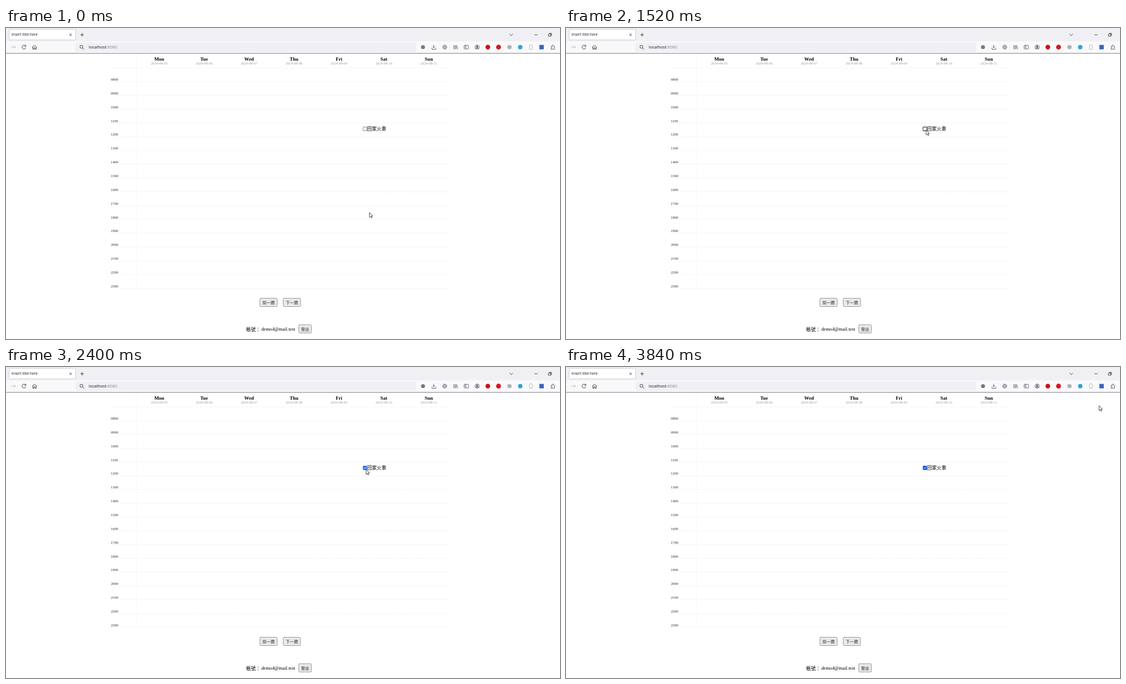
An HTML page for the animation above (3.92 s loop, 998 px wide and 561 px high).

```html
<!DOCTYPE html>
<html lang="zh-Hant">
<head>
<meta charset="utf-8">
<title>Weekly planner</title>
<style>
  html, body { margin: 0; width: 100%; height: 100%; overflow: hidden; background: #fff; }
  svg { display: block; width: 998px; height: 561px; }
  text { font: 8.65px "Liberation Serif", "Noto Sans CJK TC", "Noto Sans CJK", serif; white-space: pre; }
  .mid { text-anchor: middle; }
  .day { font-weight: bold; font-size: 8.9px; }
  .date { font-size: 6.43px; fill: #999; }
  .hour { font-size: 6.5px; fill: #222; }
  .small { font-size: 7.3px; fill: #222; }
  .ui { font-family: "Open Sans", sans-serif; fill: #15141a; }
  .btn { fill: #e9e9ed; stroke: #333; stroke-width: .8; stroke-dasharray: 1.6 1.1; }
  .icon { fill: none; stroke: #5b5b66; stroke-width: .9; }
  .grid { fill: none; stroke: #ececec; stroke-width: .8; stroke-dasharray: 2.1 1.5; }
</style>
</head>
<body>
<svg viewBox="0 0 998 561">
  <path id="lines" class="grid"/>
  <g id="labels"></g>

  <rect id="box" x="643.2" y="178.6" width="6.8" height="6.8" rx="1"/>
  <path id="tick" d="M644.7 182l1.4 1.5 2.6-3.1" fill="none" stroke="#fff"/>
  <text x="650.6" y="185" font-size="8.5">回家火車</text>

  <rect class="btn" x="457.4" y="487.5" width="31.2" height="15" rx="2"/>
  <rect class="btn" x="499.4" y="487.5" width="31.2" height="15" rx="2"/>
  <rect class="btn" x="527.4" y="535.2" width="22.8" height="15" rx="2"/>
  <text class="small mid" x="473" y="498">前一週</text>
  <text class="small mid" x="515" y="498">下一週</text>
  <text class="small mid" x="538.8" y="545.8">登出</text>
  <text x="432.5" y="546.6">帳號：</text>
  <text x="460" y="546.2">demo4@mail.test</text>

  <g id="modal">
    <path d="M0 45h998v516H0z" fill-opacity=".5"/>
    <rect x="433.5" y="277.5" width="122" height="52.5" rx="2" fill="#fff"/>
    <text x="444" y="296">2024-08-10 12:00</text>
    <text x="444" y="307">行程</text>
    <rect x="461.6" y="298.4" width="83.4" height="10.4" rx="1" fill="#fff" stroke="#77777f" stroke-width=".7"/>
    <text x="462.6" y="306.5" style="font-size:7px">回家火車</text>
    <rect x="444.4" y="309.8" width="18.8" height="9.6" rx="1.5" fill="#e9e9ed" stroke="#55555f" stroke-width=".8"/>
    <text x="453.8" y="317" class="mid" style="font:6.7px 'Liberation Sans',sans-serif">Close</text>
  </g>

  <!-- browser window -->
  <path d="M0 0h998v24H0z" fill="#f0f0f4"/>
  <path d="M0 24h998v21H0z" fill="#f9f9fb"/>
  <path id="edge" d="M0 45.8h998" stroke="#77777c"/>
  <rect x="5.5" y="2.3" width="120" height="19.2" rx="2" fill="#fff" stroke="#c9c9d0" stroke-width=".9"/>
  <rect x="125" y="26.5" width="614" height="16.6" rx="2" fill="#f0f0f4"/>
  <text class="ui" x="10" y="14.4" style="font-size:6.6px">Insert title here</text>
  <text class="ui" x="149" y="37.3" style="font-size:7.6px">localhost<tspan fill="#85858e">:8080</tspan></text>
  <g class="icon">
    <path d="M9 34.5h8m-3-3l3 3-3 3" stroke="#b9b9c0"/>
    <path d="M114.4 10.2l4 4m0-4l-4 4M133.8 12.2h6.6m-3.3-3.3v6.6M907 10.7l3.1 3 3.1-3M952 12.2h5.6" stroke="#333"/>
    <path d="M977.3 11h4v4h-4zM978.8 11V9.6h3.9v4h-1.4" stroke="#333"/>
    <path d="M35.2 32.3a3.5 3.5 0 1 0 .6 3M35.8 30.6v2.4h-2.5" stroke="#333"/>
    <path d="M47.4 34.6l4-3.7 4 3.7M48.4 34v4.3h2v-2.5h2v2.5h2V34" stroke="#333"/>
    <path d="M138 36l2.6 2.6" stroke="#333"/><circle cx="135.9" cy="33.8" r="2.7" stroke="#333"/>
    <path d="M770.6 30.5v5m-2-2l2 2 2-2M767.3 35.5v3h6.8v-3"/>
    <circle cx="790.3" cy="34.5" r="1.3"/><circle cx="790.3" cy="34.5" r="3.1"/>
    <circle cx="790.3" cy="34.5" r="3.8" stroke-dasharray="1.5 1.485"/>
    <path d="M806.6 31v7.3m2.2-7.3v7.3m2-7.3v7.3m1-6.8l2 6.8"/>
    <rect x="825.2" y="31.2" width="8" height="6.6" rx="1"/><path d="M828.4 31v7M826.2 33h1.2m-1.2 1.7h1.2"/>
    <circle cx="848.8" cy="34.5" r="3.9"/><circle cx="848.8" cy="33.4" r="1.3" fill="#5b5b66"/>
    <path d="M846.5 36.9q2.3-2.2 4.6 0" stroke-width="1.3"/>
    <rect x="943.2" y="30.5" width="5" height="8" rx=".8" stroke="#b5b5bc"/>
    <path d="M982 33h2v-1.2a1.1 1.1 0 0 1 2.2 0V33h2v5.3H982v-1.6h.8a1 1 0 0 0 0-2H982z"/>
  </g>
  <circle cx="751.2" cy="34.5" r="3.6" fill="#77777f"/>
  <circle cx="868" cy="34.5" r="4.2" fill="#c8141c"/>
  <circle cx="887.3" cy="34.5" r="4.4" fill="#d8151c"/>
  <circle cx="907" cy="34.5" r="3.8" fill="#b0b0b6"/>
  <circle cx="926.4" cy="34.5" r="4" fill="#2aa5dc"/>
  <rect x="960.8" y="30.5" width="8" height="8" fill="#3568b8"/>

  <path id="cursor" d="M0 0v8.8l2-1.8 1.4 3 1.5-.7-1.4-2.9h2.7z" fill="#fff" stroke="#222" stroke-width=".8" stroke-linejoin="round"/>
</svg>
<script>
const $ = id => document.getElementById(id);
const LOOP = 3920, STEP = 80, ROW = 24.85;

let grid = 'M235 47V469', labels = '';
const label = (cls, x, y, s) => labels += `<text class="${cls}" x="${x}" y="${y}">${s}</text>`;
'Mon Tue Wed Thu Fri Sat Sun'.split(' ').forEach((day, i) => {
  const x = 276 + i * 80.95;
  label('day mid', x, 58.7, day);
  label('date mid', x, 66.2, '2024-08-' + String(5 + i).padStart(2, '0'));
});
for (let i = 0; i < 17; i++) {
  grid += `M189 ${72 + i * ROW}H800`;
  if (i < 16) label('hour', 189, 95 + i * ROW, String(8 + i).padStart(2, '0') + '00');
}
$('lines').setAttribute('d', grid);
$('labels').innerHTML = labels;

const linear = p => p, easeIn = p => p * p, easeOut = p => p * (2 - p);
const smooth = p => p * p * (3 - 2 * p);

// pointer path: time, x, y, easing towards the point
const path = [
  [0, 654.8, 332.8, linear],
  [640, 654.8, 332.8, linear],
  [720, 651, 319.2, linear],
  [1200, 649.6, 186, smooth],
  [1520, 648.7, 184, easeOut],
  [2320, 648.7, 184, linear],
  [2640, 648.7, 189.3, smooth],
  [2800, 648.7, 189.3, linear],
  [3280, 764, 148, easeIn],
  [3840, 960.3, 69.8, easeOut],
  [LOOP, 960.3, 69.8, linear]
];

function pointer(t) {
  const i = path.findIndex(k => k[0] > t);
  const [t0, x0, y0] = path[i - 1], [t1, x1, y1, ease] = path[i];
  const p = ease((t - t0) / (t1 - t0));
  return [x0 + (x1 - x0) * p, y0 + (y1 - y0) * p];
}

function draw(now) {
  const t = Math.floor(now % LOOP / STEP) * STEP;
  const hover = t >= 1280 && t < 2480, checked = t >= 1680, open = t === 1680;
  const blue = hover ? '#2e72dc' : '#0a5bd3';
  $('cursor').setAttribute('transform', `translate(${pointer(t)})`);
  $('box').setAttribute('fill', checked ? blue : '#fff');
  $('box').setAttribute('stroke', checked ? blue : hover ? '#33333c' : '#66666f');
  $('box').setAttribute('stroke-width', hover && !checked ? 1.1 : .8);
  $('tick').style.display = checked ? '' : 'none';
  $('modal').style.display = open ? '' : 'none';
  requestAnimationFrame(draw);
}
draw(0);
</script>
</body>
</html>
```
